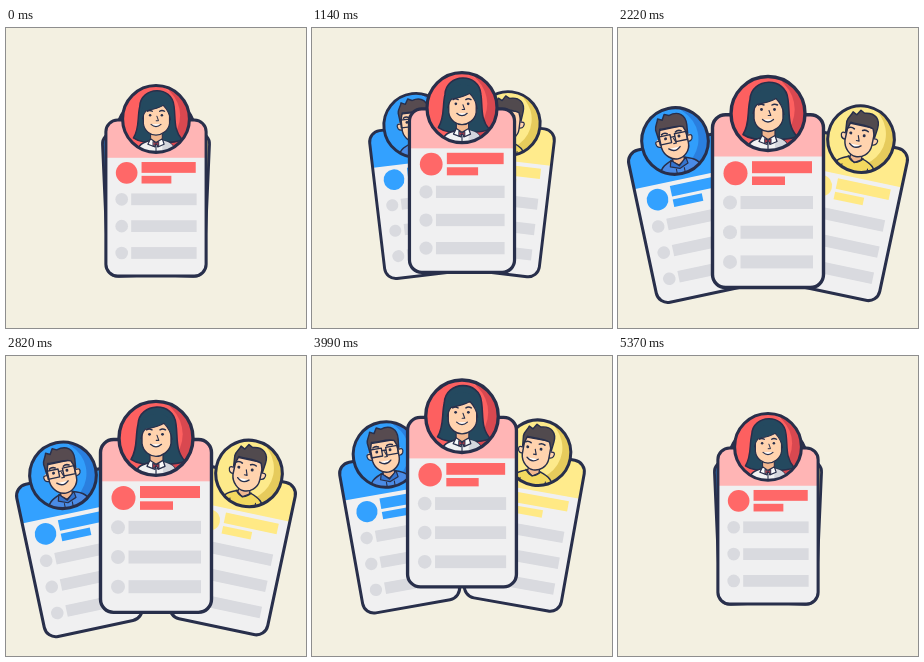
Recreate the animation shown at these times as an HTML page with a canvas. Size 300x300 px, loop 5.43 s.

```html
<!DOCTYPE html>
<html lang="en">
<head>
<meta charset="utf-8">
<title>Profile cards</title>
<style>
html, body { margin: 0; width: 100%; height: 100%; overflow: hidden; background: #f3f0e1; }
canvas { display: block; width: 300px; height: 300px; }
</style>
</head>
<body>
<canvas id="stage"></canvas>
<script>
const canvas = document.getElementById('stage');
const ctx = canvas.getContext('2d');
const dpr = window.devicePixelRatio || 1;
canvas.width = canvas.height = 300 * dpr;

const LOOP = 5430, STEP = 30, R = 38.7, LINE = 3.4;
const BACK = '#f3f0e1', INK = '#282f4b', SKIN = '#ffd3ae', SHADE = '#f2b78f';

// Keyframes: [ms, value], joined by a monotone cubic curve.
const spreadKeys = [[0, 0], [570, .07], [1140, .45], [1420, .8], [1680, 1], [3430, 1], [3700, .95],
  [3990, .8], [4260, .5], [4530, .215], [4860, .045], [5130, .01], [5430, 0]];
const topKeys = [[0, 56], [570, 52], [1140, 43], [1540, 36], [1710, 37.6], [2220, 46.8], [2470, 49],
  [2850, 43], [3360, 28], [3740, 20], [3990, 22.3], [4530, 41], [5130, 55], [5430, 56]];
const sideKeys = [[0, 102.5], [570, 100.5], [1140, 97.3], [1300, 97.3], [1710, 105], [2220, 113],
  [2640, 120.3], [2850, 119], [3360, 109.7], [3990, 98.5], [4200, 97.3], [4500, 98], [5430, 102.5]];

function track(keys, t) {
  const n = keys.length;
  let i = 0;
  while (i < n - 2 && t >= keys[i + 1][0]) i++;
  const slope = k => (keys[k + 1][1] - keys[k][1]) / (keys[k + 1][0] - keys[k][0]);
  const tangent = k => {
    if (k === 0 || k === n - 1) return 0;
    const a = slope(k - 1), b = slope(k);
    return a * b <= 0 ? 0 : 2 * a * b / (a + b);
  };
  const [t0, a] = keys[i], [t1, b] = keys[i + 1];
  const h = t1 - t0, u = (t - t0) / h, v = 1 - u;
  return a * (1 + 2 * u) * v * v + b * u * u * (3 - 2 * u)
    + h * u * v * (tangent(i) * v - tangent(i + 1) * u);
}

function disc(x, y, r, color) {
  ctx.beginPath();
  ctx.arc(x, y, r, 0, Math.PI * 2);
  ctx.fillStyle = color;
  ctx.fill();
}

function bar(x, y, w, h, color) {
  ctx.fillStyle = color;
  ctx.fillRect(x, y, w, h);
}

function shape(d, fill, line, color = INK) {
  const p = new Path2D(d);
  if (fill) { ctx.fillStyle = fill; ctx.fill(p); }
  if (line) { ctx.lineWidth = line; ctx.strokeStyle = color; ctx.stroke(p); }
}

function features(x, y) {
  disc(x - 6.5, y - 3, 1.4, INK);
  disc(x + 6.5, y - 3, 1.4, INK);
  shape(`M${x - 9.5} ${y - 7.5}q2.5 -1.7 5.5 0M${x + 4} ${y - 7.5}q2.5 -1.7 5.5 0`, null, 1.5);
  shape(`M${x + 1} ${y - 2}l1.8 5h-2.6`, null, 1.1);
  shape(`M${x - 5.5} ${y + 7}q5.5 5 11 0`, '#fff', 1.3);
}

function woman() {
  shape('M-18 -14C-17 -36 18 -38 20 -14C22 0 19 12 29 23C20 27 8 26 0 26C-10 26 -18 26 -25 21C-18 10 -21 -1 -18 -14Z', '#24495f', 1.6);
  shape('M-21 40C-21 28 -14 26 -6 24H7C16 26 21 29 21 40Z', '#f1f1f2', 1.7);
  shape('M6 40L8 24C16 26 21 29 21 40Z', '#d5d7dd');
  shape('M-6 12V24L0 28L7 24V12Z', SHADE, 1.2);
  shape('M-14 -12V5C-13 14 -5 18 0 18C6 18 14 13 15 5V-12C10 -17 -8 -18 -14 -12Z', SKIN, 1.4);
  shape('M-15 0C-18 -14 -12 -26 4 -24C16 -23 20 -11 16 1C15 -6 13 -10 8 -15C1 -11 -6 -10 -11 -9C-14 -6 -14 -3 -15 0Z', '#24495f');
  shape('M-15 0C-14 -3 -14 -6 -11 -9C-6 -10 1 -11 8 -15C13 -10 15 -6 16 1', null, 1.2);
  features(0, -1);
  shape('M-6 22L-9 28L-1 31L0 26L2 31L9 28L7 22L0 26Z', '#fafafa', 1.3);
  shape('M-3 25L0 27L3 25V30L0 28L-3 30Z', '#a23a4a', 1);
  shape('M0 30V38', null, 1.2);
}

function head(x, look, hair) {
  ctx.save();
  ctx.translate(x, -1);
  ctx.scale(1.17, 1.17);
  shape('M-5 10V20L0 24L6 20V10Z', SHADE, 1.2);
  disc(-14, 0, 3.5, SKIN);
  disc(14, 0, 3.5, SKIN);
  shape('M-14 -2q-5 -1 -3 4q1 2 4 2M14 -2q5 -1 3 4q-1 2 -4 2', null, 1.2);
  shape('M-13 -12V5C-12 13 -5 18 0 18C6 18 13 13 13 5V-12Z', SKIN, 1.4);
  shape('M-14 -3L-15 -13C-15 -17 -12 -19 -11 -23L-7 -21L-4 -26L0 -24C10 -27 16 -21 15 -12L14 -3L11 -11C5 -14 -5 -12 -11 -13Z', hair, 1.4);
  features(look, 0);
  ctx.restore();
}

function coder() {
  shape('M-25 40C-25 27 -16 23 -7 20H7C17 23 24 27 25 40Z', '#4a8be6', 1.7);
  head(-1, -1, '#574b50');
  shape('M-17 -8h13v9h-13zM1 -8h13v9h-13zM-4 -5h5', null, 1.5);
  shape('M-9 20L-11 27L-1 31L9 27L8 20L-1 28Z', '#3574cf', 1.4);
  shape('M-5 31V37M4 31V37', null, 1.2);
}

function designer() {
  shape('M-25 40C-25 28 -17 24 -8 21H6C16 24 23 28 24 40Z', '#f3d95f', 1.7);
  head(-2, -2.5, '#514a4e');
  shape('M-10 21Q-2 32 7 21', null, 1.5);
  shape('M-15 31V37M14 31V37', null, 1.2);
}

const red = { header: '#ffb5b5', main: '#ff6868', disc: '#fd6060', dark: '#d94850', rim: '#ff9b98', person: woman };
const blue = { header: '#33a1ff', main: '#33a1ff', disc: '#319efb', dark: '#2a7fdf', rim: '#5fb6ff', person: coder };
const yellow = { header: '#ffeb8c', main: '#ffe985', disc: '#fdea8b', dark: '#e6cb5c', rim: '#fff3b4', person: designer };

function avatar(c) {
  ctx.save();
  ctx.beginPath();
  ctx.arc(0, 0, R - LINE / 2, 0, Math.PI * 2);
  ctx.clip();
  disc(0, 0, R, c.dark);
  disc(-13, -5, R - 1, c.rim);
  disc(-9, -4, R - 3, c.disc);
  c.person();
  ctx.restore();
  ctx.beginPath();
  ctx.arc(0, 0, R - LINE / 2, 0, Math.PI * 2);
  ctx.lineWidth = LINE;
  ctx.strokeStyle = INK;
  ctx.stroke();
}

// The middle of the avatar is the card's own zero point.
function card(x, y, scale, angle, c) {
  ctx.save();
  ctx.translate(x, y);
  ctx.rotate(angle * Math.PI / 180);
  ctx.scale(scale, scale);
  const body = new Path2D();
  body.roundRect(-55.5, 1.2, 111, 172.8, 13);
  ctx.save();
  ctx.clip(body);
  bar(-57, 0, 114, 176, '#f0f0f1');
  bar(-57, 0, 114, 43, c.header);
  ctx.restore();
  disc(-32.5, 59.7, 12, c.main);
  bar(-16, 47.7, 60, 12, c.main);
  bar(-16, 63, 33, 8.5, c.main);
  for (let i = 0; i < 3; i++) {
    const row = 89 + i * 29.7;
    disc(-38, row, 7, '#d9dadf');
    bar(-27.5, row - 6.5, 72.5, 13, '#d9dadf');
  }
  ctx.lineWidth = LINE;
  ctx.strokeStyle = INK;
  ctx.stroke(body);
  avatar(c);
  ctx.restore();
}

function draw(t) {
  ctx.setTransform(dpr, 0, 0, dpr, 0, 0);
  ctx.lineJoin = ctx.lineCap = 'round';
  bar(0, 0, 300, 300, BACK);
  const p = track(spreadKeys, t);
  const sideY = track(sideKeys, t);
  const shift = 8 + 85 * p, tilt = 2.5 + 9.5 * p, small = .83 + .07 * p;
  const scale = .903 + .097 * p;
  card(150 - shift, sideY, small, -tilt, blue);
  card(150 + shift, sideY - 1.8 * Math.min(1, p * 3), small, tilt, yellow);
  card(150, track(topKeys, t) + R * scale, scale, 0, red);
}

const start = performance.now();
function loop() {
  const t = (performance.now() - start) % LOOP;
  draw(Math.min(LOOP - 2 * STEP, Math.floor(t / STEP) * STEP));
  requestAnimationFrame(loop);
}
loop();
</script>
</body>
</html>
```
